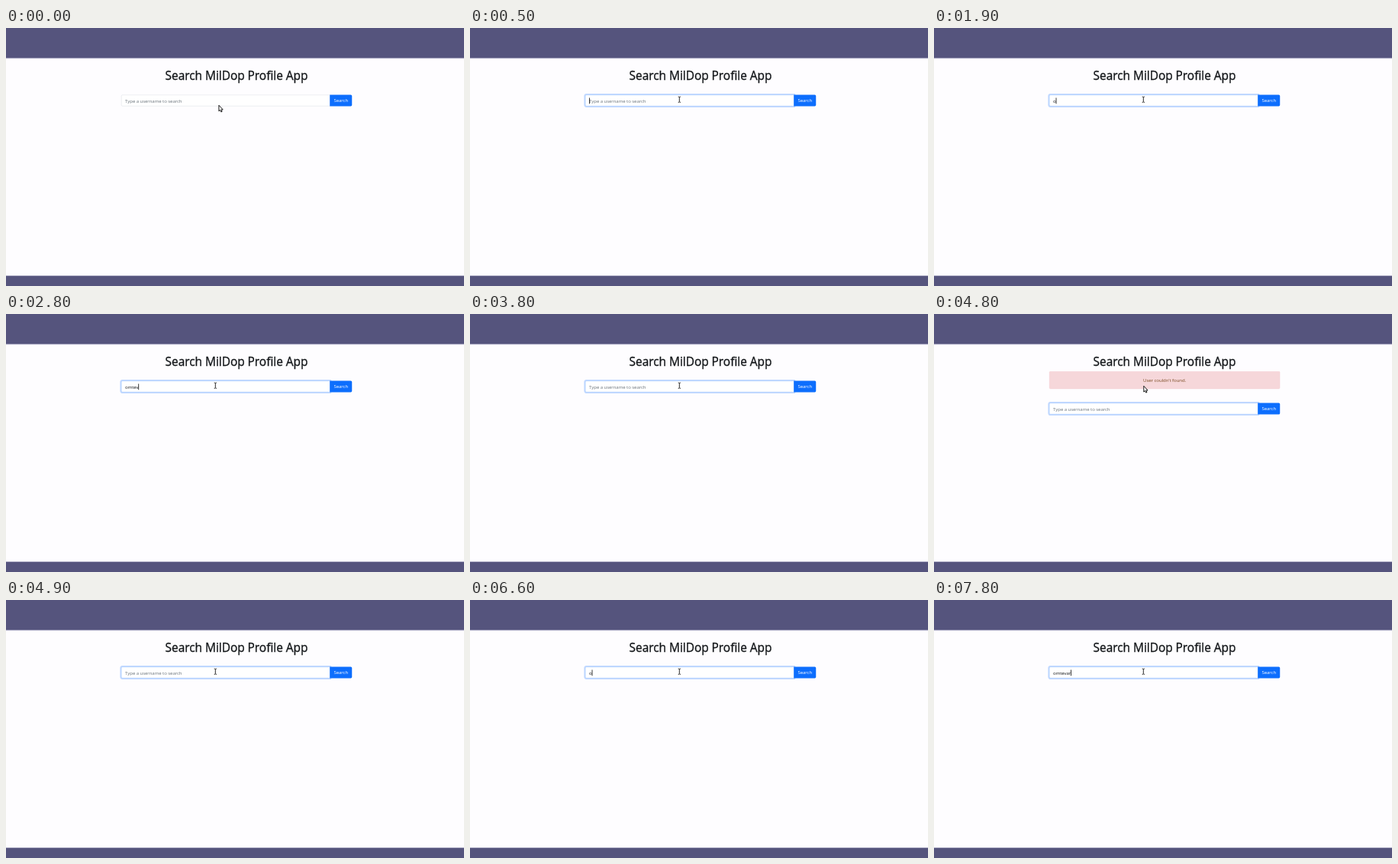
These frames come from a looping animation (600 px wide and 338 px high, 8 s). An HTML page:

```html
<!DOCTYPE html>
<html lang="en">
<head>
<meta charset="utf-8">
<title>Profile search</title>
<style>
  html, body { margin: 0; width: 100%; height: 100%; overflow: hidden; }
  body {
    position: relative;
    background: #fefdff;
    font-family: "Open Sans", "Noto Sans", sans-serif;
    color: #15181b;
    white-space: pre;
  }
  body > *, .form > *, .group > * { position: absolute; box-sizing: border-box; }
  .bar { left: 0; width: 600px; background: #55547d; }
  .top { top: 0; height: 39px; box-shadow: 0 1px #a9a8c1, 0 2px #efeef6; }
  .bottom { top: 325px; height: 13px; box-shadow: 0 -1px #b5b4ca; }
  h1 {
    left: 151px; top: 53px; width: 302px; margin: 0;
    font-size: 15.4px; font-weight: 400; line-height: 20px;
    -webkit-text-stroke: .35px;
    text-align: center;
  }
  /* The form is laid out at full page size and shown reduced. */
  .form {
    left: 150.6px; top: 75px; width: 771px; height: 150px;
    transform: scale(.392); transform-origin: 0 0;
    font-size: 15.5px; letter-spacing: -.2px;
  }
  .alert {
    left: 0; top: 0; width: 771px; height: 59px;
    border: 1px solid #f5c9ce; border-radius: 4px;
    background: #f6d7da; color: #7b4b22;
    line-height: 58px; text-align: center;
  }
  .group { left: 0; top: 32px; width: 771px; height: 38px; line-height: 38px; }
  .group.low { top: 106px; }
  .field {
    left: 0; top: 0; width: 698px; height: 38px;
    border: 1px solid #ced4da; border-radius: 4px 0 0 4px;
    background: #fff;
    line-height: 38px;
  }
  .hint, .entry { position: absolute; left: 12px; top: 0; }
  .hint { color: #6c757d; }
  .caret {
    display: inline-block; width: 2px; height: 20px; margin-right: -2px;
    background: #000; vertical-align: -4px;
  }
  .button {
    left: 697px; top: 0; width: 74px; height: 38px;
    border-radius: 0 4px 4px 0;
    background: #0d6efd; color: #fff; text-align: center;
  }
  svg { left: 0; top: 0; width: 12px; height: 14px; overflow: visible; }
</style>
</head>
<body>
<div class="bar top"></div>
<h1>Search MilDop Profile App</h1>
<div class="form">
  <div class="alert" id="alert">User couldn't found.</div>
  <div class="group" id="group">
    <div class="field" id="field"><span class="hint" id="hint">Type a username to search</span><span class="entry"><span id="typed"></span><i class="caret" id="caret"></i></span></div>
    <div class="button">Search</div>
  </div>
</div>
<div class="bar bottom"></div>
<svg id="pointer">
  <path id="arrow" d="M.5 .5V8.2L2.2 6.7L3.4 9.3L4.7 8.7L3.6 6.2H5.8Z" fill="#fff" stroke="#000" stroke-width=".9"/>
  <path id="beam" d="M-1.6-3.7H-.5L0-3.2L.5-3.7H1.6M0-3.2V3M-1.6 3.5H-.5L0 3L.5 3.5H1.6" fill="none" stroke="#111" stroke-width=".9"/>
</svg>
<script>
  const LOOP = 8000, STEP = 100;
  const NAME = "omtevar";
  const FOCUS = 400, SUBMIT = 3800, ALERT_ON = 3900, ALERT_OFF = 4900;

  // Times at which each letter of the name appears, per attempt.
  const attempts = [
    { from: 0, keys: [1900, 2100, 2300, 2500, 2800, 3100, 3300] },
    { from: SUBMIT, keys: [6500, 6700, 6900, 7000, 7600, 7800, 7800] }
  ];
  // Times at which the caret turns on or off, starting with on.
  const blinks = [FOCUS, 900, 1400, SUBMIT, 4300, 4800, 5300, 5800, 6400, 7500, 7600];

  const el = id => document.getElementById(id);
  const [alertBox, group, field, hint, typed, caret, pointer, arrow, beam] =
    ["alert", "group", "field", "hint", "typed", "caret", "pointer", "arrow", "beam"].map(el);
  const passed = (times, t) => times.filter(k => k <= t).length;
  const clamp = x => Math.max(0, Math.min(1, x));
  const show = (node, on) => { node.style.display = on ? "" : "none"; };

  function render(t) {
    const attempt = attempts.findLast(a => a.from <= t);
    const count = passed(attempt.keys, t);
    typed.textContent = NAME.slice(0, count);
    show(hint, count === 0);
    show(caret, passed(blinks, t) % 2 === 1);

    const warned = t >= ALERT_ON && t < ALERT_OFF;
    show(alertBox, warned);
    group.classList.toggle("low", warned);

    const focus = clamp((t - FOCUS + 80) / 150);
    const mix = (a, b) => Math.round(a + (b - a) * focus);
    field.style.borderColor = `rgb(${mix(206, 134)},${mix(212, 183)},${mix(218, 254)})`;
    field.style.boxShadow = `0 0 0 4px rgba(13,110,253,${0.25 * focus})`;

    const move = clamp(t / 200);
    const x = 278.4 - 4.1 * move, y = 100.7 - 6.9 * move;
    pointer.style.transform = `translate(${x}px,${y}px)`;
    const pointing = t < 100 || warned;
    show(arrow, pointing);
    show(beam, !pointing);
  }

  function tick() {
    render(Math.floor(performance.now() % LOOP / STEP) * STEP);
    requestAnimationFrame(tick);
  }
  tick();
</script>
</body>
</html>
```
